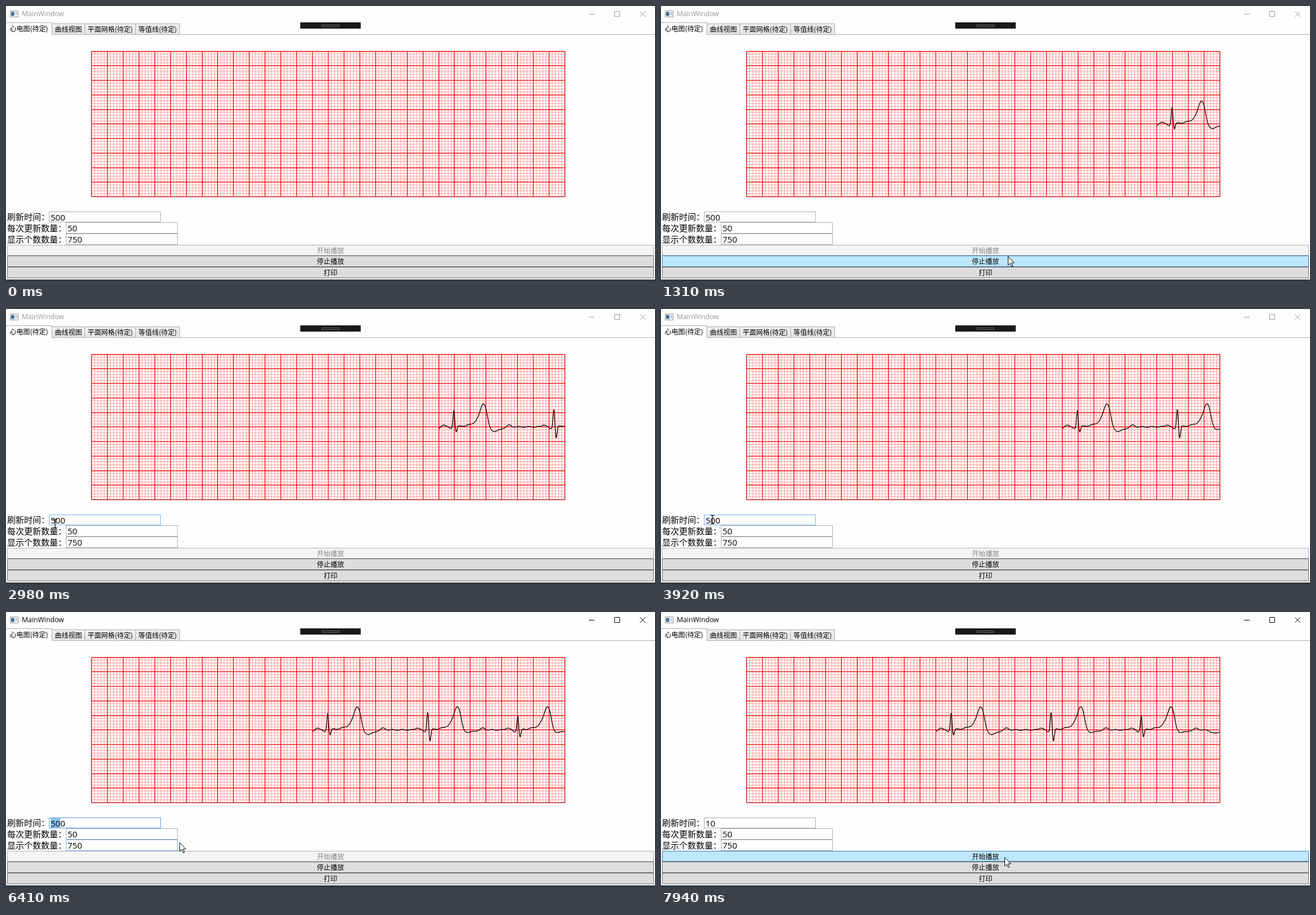
An HTML page that plays this animation: 1149x487 px, repeating every 8000 ms.

```html
<!DOCTYPE html>
<html lang="zh-CN">
<head>
<meta charset="utf-8">
<title>MainWindow</title>
<style>
html, body { margin: 0; width: 100%; height: 100%; overflow: hidden; background: #fefefe; }
body { position: relative; color: #000; font: 12px "Open Sans", "Noto Sans CJK SC", "Noto Sans CJK", sans-serif; }
div, svg { position: absolute; box-sizing: border-box; white-space: nowrap; }
svg { left: 0; top: 0; width: 1149px; height: 487px; pointer-events: none; }
.zh, .tab, .btn { font-family: "Noto Sans CJK SC", "Noto Sans CJK", sans-serif; }
#title { left: 28px; top: 4px; font-size: 12.25px; line-height: 20px; }
#win { color: #999; }
#win.active { color: #000; }
.tab { top: 31px; height: 20px; line-height: 18px; text-align: center; border: 1px solid #acacac;
  background: linear-gradient(#f0f0f0, #e5e5e5); }
.tab.on { top: 29px; height: 22px; line-height: 20px; background: #fefefe; border-bottom: 0; z-index: 1; }
#rule { left: 0; top: 50px; width: 1149px; height: 1px; background: #acacac; }
#bar { left: 521px; top: 29px; width: 107px; height: 11px; background: #17191b; }
#bar div { left: 38px; top: 4px; width: 31px; height: 4px; border: 1px solid #666; }
.label { left: 2px; height: 20px; font-size: 15px; line-height: 20px; }
.field { width: 198px; border: 1px solid #abadb3; background: #fff; font-size: 15px; line-height: 18px; padding-left: 2px; }
.field span { position: relative; }
.field.hover { border-color: #7eb4ea; }
.field.focus { border-color: #569de5; }
.sel { top: 0; height: 17px; background: #8fc3ed; }
.btn { left: 2px; width: 1145px; line-height: 18px; text-align: center; background: #ddd; border: 1px solid #707070; }
.btn.hover { background: #bee6fd; border-color: #3c7fb1; }
.btn.press { background: #c4e5f6; border-color: #2c628b; }
.btn.off { background: #f4f4f4; border-color: #adb2b5; color: #838383; }
#edge { left: 0; top: 484px; width: 1149px; height: 3px; background: #333; border-top: 1px solid #777; }
.active ~ #edge { border-color: #2b5f8f; }
</style>
</head>
<body>
<div id="win">
  <div id="title">MainWindow</div>
  <svg fill="none" stroke="currentColor">
    <path d="M1032 14.5h10M1077.5 9.5h9v9h-9zM1122.5 9.5l9.5 9.5M1132 9.5l-9.5 9.5"/>
    <path d="M7.5 8.5h14v11h-14z" stroke="#999" fill="#f4f4f4"/>
    <path d="M9 10.5h5.5v7H9z" stroke="none" fill="#3a6c9c"/>
    <path d="M16 11h4v5h-4z" stroke="none" fill="#ccc"/>
  </svg>
</div>
<div id="rule"></div>
<div id="bar"><div></div></div>
<svg fill="none">
  <path id="minor" stroke="#f00" stroke-opacity=".7" stroke-width=".5"/>
  <path id="major" stroke="#f00" stroke-width="1.25"/>
  <path id="frame" stroke="#b00000"/>
  <path id="wave" stroke="#100" stroke-width="1.35" stroke-linejoin="round"/>
</svg>
<div id="edge"></div>
<svg style="z-index:5">
  <g id="pointer">
    <circle id="halo" r="12" fill="#f2ef30" fill-opacity=".7"/>
    <path id="arrow" d="M.5 .5V16l3.6-3.3 2.6 5.8 2.3-1-2.6-5.6h5z" fill="#fff" stroke="#000"/>
    <path id="beam" d="M-3.5 -7.5h2.5l1 1 1-1h2.5M0 -6.5v13M-3.5 7.5h2.5l1-1 1 1h2.5" fill="none" stroke="#000" stroke-width="1.2"/>
  </g>
</svg>
<script>
const LOOP = 8000;
const $ = id => document.getElementById(id);
const draw = (id, d) => $(id).setAttribute('d', d);
const show = (el, on) => { el.style.display = on ? '' : 'none'; };
const within = (t, a, b) => t >= a && t < b;

function box(cls, text, place) {
  const el = document.createElement('div');
  el.className = cls;
  el.textContent = text;
  for (const k in place) el.style[k] = place[k] + 'px';
  document.body.append(el);
  return el;
}

// Tabs are as wide as their text; every form row is about 20px high
let tabX = -1;
['心电图(待定)', '曲线视图', '平面网格(待定)', '等值线(待定)'].forEach((name, i) => {
  const width = (name.length > 4 ? name.length * 12 - 5 : 59) - (i ? 0 : -4) - (i === 3 ? 0 : 0);
  box(i ? 'tab' : 'tab on', name, { left: tabX, width });
  tabX += width - 1;
});

const fields = [['刷新时间：', '500'], ['每次更新数量：', '50'], ['显示个数数量：', '750']].map(([name, value], i) => {
  const x = 1 + name.length * 15, y = i ? 363 + i * 20 : 364, h = i ? 20 : 19;
  box('zh label', name, { top: 363 + i * 20 });
  const el = box('field', '', { left: x, top: y, height: h });
  const sel = document.createElement('div');
  const span = document.createElement('span');
  sel.className = 'sel';
  span.textContent = value;
  el.append(sel, span);
  return { el, sel, span, x, y, w: 202, h };
});
const buttons = ['开始播放', '停止播放', '打印'].map((name, i) => {
  const y = i ? 422 + i * 20 : 423, h = i ? 20 : 19;
  return { el: box('btn', name, { top: y, height: h }), x: 2, y, w: 1145, h };
});

// Chart paper
const L = 151.5, R = 989.5, T = 80, B = 337.5;
function grid(cols, rows, snap) {
  let d = '';
  for (let i = 0; i <= cols; i++) d += `M${snap(L + (R - L) * i / cols)} ${T}V${B}`;
  for (let i = 0; i <= rows; i++) d += `M${L} ${snap(T + (B - T) * i / rows)}H${R}`;
  return d;
}
draw('minor', grid(150, 50, v => v));
draw('major', grid(30, 10, v => Math.floor(v) + .5));
draw('frame', `M${L} ${T}V${B}H${R}V${T}`);

// Heartbeat: small P, Q dip, sharp R and S, slow T rise with a steep fall
const bump = (d, w) => Math.exp(-d * d / (w * w));
const tWave = d => d < 0 ? 1 / (1 + d * d / 64) : Math.exp(-Math.pow(d / 8.5, 2.6));
const beat = (x, b) => {
  const d = x - b.at;
  return 3.5 * bump(d + 18, 4.5) - 4 * bump(d + 6, 4) + b.r * bump(d, 2) - b.s * bump(d - 4, 2.3)
    + 42 * tWave(d - 52) - b.dip * bump(d - 73, 13) + 3 * bump(d - 98, 6);
};
const beats = [
  { at: 27, r: 30, s: 10, dip: 7.5 },
  { at: 204, r: 32, s: 21, dip: 4 },
  { at: 363.5, r: 25, s: 14, dip: 4 }
];
function ecg(x) {
  let y = 209 - Math.cos((x - 124) / 2.8) * .8 + 4 * bump(x, 4) + 6 * bump(x - 494, 9);
  for (const b of beats) y -= beat(x, b);
  return y;
}

const STEP = (R - L) / 15;
const ticks = [70, 700, 1720, 2580, 3150, 4690, 5240, 5800, 7000];
function wave(n) {
  const pts = [];
  for (let x = 0; n && x <= n * STEP; x += .5) pts.push((R - n * STEP + x).toFixed(1) + ' ' + ecg(x).toFixed(2));
  return n ? 'M' + pts.join('L') : '';
}
const waves = [0, ...ticks].map((_, n) => wave(n));

// Pointer path: time, x, y
const path = [
  [380, 650, 482], [850, 615, 444], [1310, 615, 443], [1720, 400, 400], [2200, 186, 402],
  [2510, 91, 395], [3220, 85, 373], [3920, 91, 373], [4460, 97, 373], [5240, 97, 373],
  [5800, 82, 374], [6080, 82, 373], [6410, 307, 408], [7240, 621, 451], [7600, 621, 451], [7940, 608, 434]
];
function pointer(t) {
  const i = path.findIndex(p => p[0] > t);
  if (i < 0) return path[path.length - 1].slice(1);
  if (!i) return [-99, -99];
  const a = path[i - 1], b = path[i], u = (t - a[0]) / (b[0] - a[0]);
  return [1, 2].map(k => Math.round(a[k] + (b[k] - a[k]) * u));
}

function render(t) {
  draw('wave', waves[ticks.filter(k => k <= t).length]);
  $('win').className = t >= 5150 ? 'active' : '';

  const [x, y] = pointer(t);
  const over = b => within(x, b.x, b.x + b.w) && within(y, b.y, b.y + b.h);
  const focus = within(t, 5150, 7390);
  const press = within(t, 7390, 7560);

  fields.forEach((f, i) => {
    f.el.className = 'field' + (over(f) ? ' hover' : '') + (!i && focus ? ' focus' : '');
    show(f.sel, !i && within(t, 5600, 6600));
  });
  const first = fields[0], from = t < 5720 ? 1 : 0;
  first.sel.style.left = 2 + from * 8.6 + 'px';
  first.sel.style.width = (2 - from) * 8.6 + 'px';
  first.span.textContent = t < 6600 ? '500' : t < 6750 ? '1' : '10';

  buttons.forEach((b, i) => {
    const off = !i && t < 7560;
    b.el.className = 'btn ' + (off ? 'off' : !over(b) ? '' : press ? 'press' : 'hover');
  });

  const text = fields.some(f => over(f) && x < f.x + 198);
  $('pointer').setAttribute('transform', `translate(${x} ${y})`);
  show($('arrow'), !text);
  show($('beam'), text);
  show($('halo'), within(t, 5150, 5600) || press);
}

const start = performance.now();
function frame() {
  render((performance.now() - start) % LOOP);
  requestAnimationFrame(frame);
}
frame();
</script>
</body>
</html>
```
